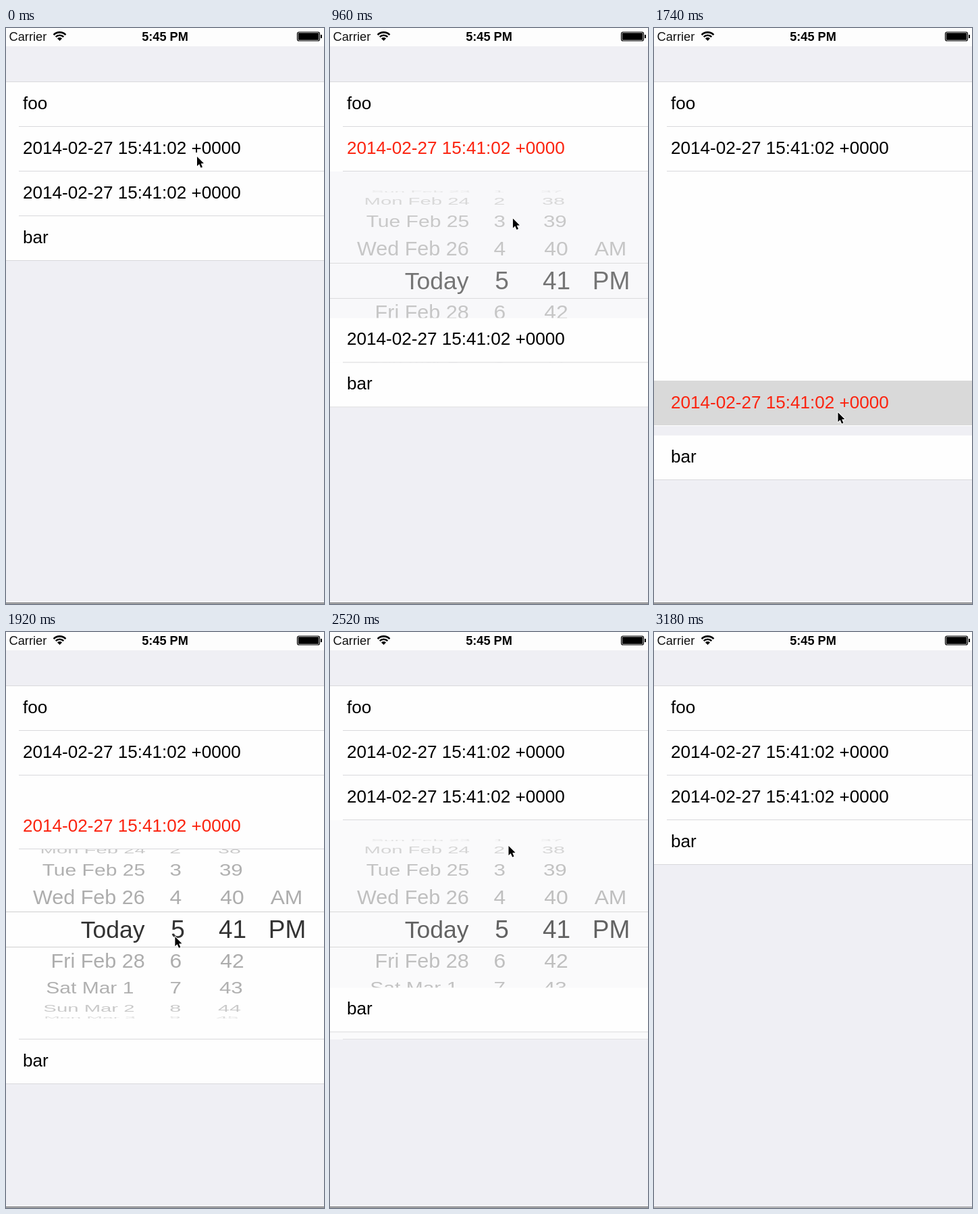
These frames come from a looping animation (471x851 px, 3220 ms). An HTML page with a canvas:

```html
<!DOCTYPE html>
<html lang="en">
<head>
<meta charset="utf-8">
<title>Inline date picker</title>
<style>
html, body { margin: 0; width: 100%; height: 100%; overflow: hidden; background: #efeff4; }
canvas { display: block; }
</style>
</head>
<body>
<canvas id="stage" width="471" height="851"></canvas>
<script>
const ctx = document.getElementById('stage').getContext('2d');
const W = 471, H = 851, LOOP = 3220, STEP = 60;
const ROW = 66, TOP = 79, PICKER = 324, INSET = 19;
const FONT = '"Liberation Sans", Arial, sans-serif';
const BG = '#efeff4', CELL = '#fefefe', LINE = '#d9d9dc', RED = '#fb2410';
const STAMP = '2014-02-27 15:41:02 +0000';
const LABELS = ['foo', STAMP, STAMP, 'bar'];

// Start times of the three table animations
const OPEN = 780, SWAP = 1696, CLOSE = 2419, MOVE = 300;

// Pointer path: time, x, y
const PATH = [
  [0, 283, 190], [60, 278, 185], [780, 278, 185], [1200, 261.5, 410],
  [1320, 262, 450], [1620, 274, 565], [1740, 272.5, 568], [1800, 270, 535],
  [2220, 201.5, 238.5], [2400, 201.5, 238.5], [2460, 215, 257],
  [2520, 264.5, 316], [2940, 452, 833]
];

// Wheel rows: date, hour, minute, half of day
const WHEEL = [
  ['Sun Feb 23', 1, 37], ['Mon Feb 24', 2, 38], ['Tue Feb 25', 3, 39],
  ['Wed Feb 26', 4, 40, 'AM'], ['Today', 5, 41, 'PM'], ['Fri Feb 28', 6, 42],
  ['Sat Mar 1', 7, 43], ['Sun Mar 2', 8, 44], ['Mon Mar 3', 9, 45]
];
const SHADES = ['#333', '#adadad', '#b0b0b0', '#c9c9c9', '#dcdcdc'];

// Same curve as cubic-bezier(.42, 0, .58, 1)
function ease(p) {
  if (p <= 0) return 0;
  if (p >= 1) return 1;
  let lo = 0, hi = 1, s = 0.5;
  for (let i = 0; i < 24; i++) {
    s = (lo + hi) / 2;
    const q = 1 - s;
    const x = 3 * q * q * s * 0.42 + 3 * q * s * s * 0.58 + s * s * s;
    if (x < p) lo = s; else hi = s;
  }
  return s * s * (3 - 2 * s);
}

function rect(x, y, w, h, color) {
  ctx.fillStyle = color;
  ctx.fillRect(x, y, w, h);
}

function text(str, x, y, size, color, align = 'left', weight = '') {
  ctx.font = `${weight} ${size}px ${FONT}`;
  ctx.textAlign = align;
  ctx.fillStyle = color;
  ctx.fillText(str, x, y);
}

function line(y, x = 0, color = LINE) {
  rect(x, y, W - x, 1, color);
}

function statusBar() {
  rect(0, 0, W, 27, '#fdfdfd');
  text('Carrier', 4.5, 19, 18.3, '#111');
  text('5:45 PM', 235.5, 19, 18.2, '#000', 'center', 'bold');

  const fan = (r, width) => {
    ctx.beginPath();
    ctx.arc(79.5, 19, r, -Math.PI * 0.75, -Math.PI * 0.25);
    ctx.lineWidth = width;
    ctx.stroke();
  };
  ctx.strokeStyle = '#000';
  fan(12.6, 2.6);
  fan(8.2, 2.5);
  fan(2.5, 5);

  ctx.lineWidth = 1.2;
  ctx.beginPath();
  ctx.roundRect(431.5, 6, 33, 13, 2.5);
  ctx.stroke();
  ctx.beginPath();
  ctx.roundRect(432.8, 7.3, 30.4, 10.4, 1);
  ctx.fillStyle = '#000';
  ctx.fill();
  rect(466, 10, 2, 5, '#000');
}

function wheelRow(row, k, mid) {
  const angle = k * 20.7 * Math.PI / 180;
  const flat = Math.cos(angle);
  const depth = 1 - 0.085 * (1 - flat);
  const color = SHADES[Math.abs(k)];
  const size = k ? 30.7 : 35.5;
  const big = k ? 32 : 37;
  const [date, hour, minute, half] = row;
  const pad = /\D\d$/.test(date) ? size * 0.556 : 0;
  const base = size * 0.358;

  ctx.save();
  ctx.translate(235, mid + 132 * Math.sin(angle));
  ctx.scale(depth, flat);
  text(date, -29.5 - pad, base, size, color, 'right');
  text(hour, k ? 16.5 : 19.5, base, big, color, 'center');
  text(minute, 100.5, base, big, color, 'center');
  if (half) text(half, 181.5, base, big, color, 'center');
  ctx.restore();
}

function picker(top, alpha) {
  ctx.save();
  ctx.globalAlpha = alpha;
  rect(0, top + 1, W, PICKER, CELL);
  WHEEL.forEach((row, i) => wheelRow(row, i - 4, top + 161.8));
  line(top + 136, 0, '#cfcfcf');
  line(top + 188, 0, '#cfcfcf');
  line(top + PICKER, INSET);
  ctx.restore();
}

// A cell leaves its top pixel to the separator of the cell above
function tableRow(i, top, color, lit) {
  rect(0, top + 1, W, ROW, CELL);
  if (lit) rect(0, top, W, ROW, '#d9d9d9');
  else line(top + ROW, i === 3 ? 0 : INSET);
  if (!i) line(top);
  text(LABELS[i], 25, top + 41, 26.1, color);
}

function table(t) {
  const tops = LABELS.map((_, i) => TOP + ROW * i);
  const first = tops[2], second = tops[3];
  let red = -1, lit = -1;

  if (t >= CLOSE) {
    const e = ease((t - CLOSE) / MOVE);
    if (t < 2520) lit = 2;
    tops[3] += PICKER * (1 - e);
    if (e < 1) picker(second, 1 - e);
  } else if (t >= SWAP) {
    red = 2;
    if (t < 1800) lit = 2;
    else picker(second, 1);
    tops[2] += PICKER * (1 - ease((t - SWAP) / MOVE));
    tops[3] += PICKER;
    rect(0, first, W, tops[2] - first + 1, CELL);
  } else if (t >= OPEN) {
    const e = ease((t - OPEN) / MOVE);
    if (t < 840) lit = 1;
    else red = 1;
    tops[2] += PICKER * e;
    tops[3] += PICKER * e;
    if (e) picker(first, e);
  }

  const show = i => tableRow(i, tops[i], i === red ? RED : '#000', i === lit);
  [3, 2, 1, 0].forEach(show);
  if (lit >= 0) {
    show(lit);
    if (tops[lit] === first) line(first, INSET);
  }
}

function pointer(t) {
  if (t >= 3000) return;
  const n = Math.max(1, PATH.findIndex(p => p[0] >= t));
  const a = PATH[n - 1], b = PATH[n];
  const f = (t - a[0]) / (b[0] - a[0]);
  ctx.save();
  ctx.translate(a[1] + (b[1] - a[1]) * f, a[2] + (b[2] - a[2]) * f);
  ctx.beginPath();
  [[0, 0], [0, 14], [3.2, 11], [5.6, 16.5], [8, 15.4], [5.7, 10.2], [10, 10]]
    .forEach(([x, y]) => ctx.lineTo(x, y));
  ctx.closePath();
  ctx.lineJoin = 'round';
  ctx.lineWidth = 2;
  ctx.strokeStyle = '#fff';
  ctx.stroke();
  ctx.fillStyle = '#000';
  ctx.fill();
  ctx.restore();
}

function draw(time) {
  const t = Math.floor((time % LOOP) / STEP) * STEP;
  rect(0, 0, W, H, BG);
  statusBar();
  table(t);
  line(849, 0, t < 3180 ? '#555' : '#8c8c8c');
  line(850, 0, '#d0d0d2');
  pointer(t);
}

const start = performance.now();
function tick() {
  draw(performance.now() - start);
  requestAnimationFrame(tick);
}
tick();
</script>
</body>
</html>
```
